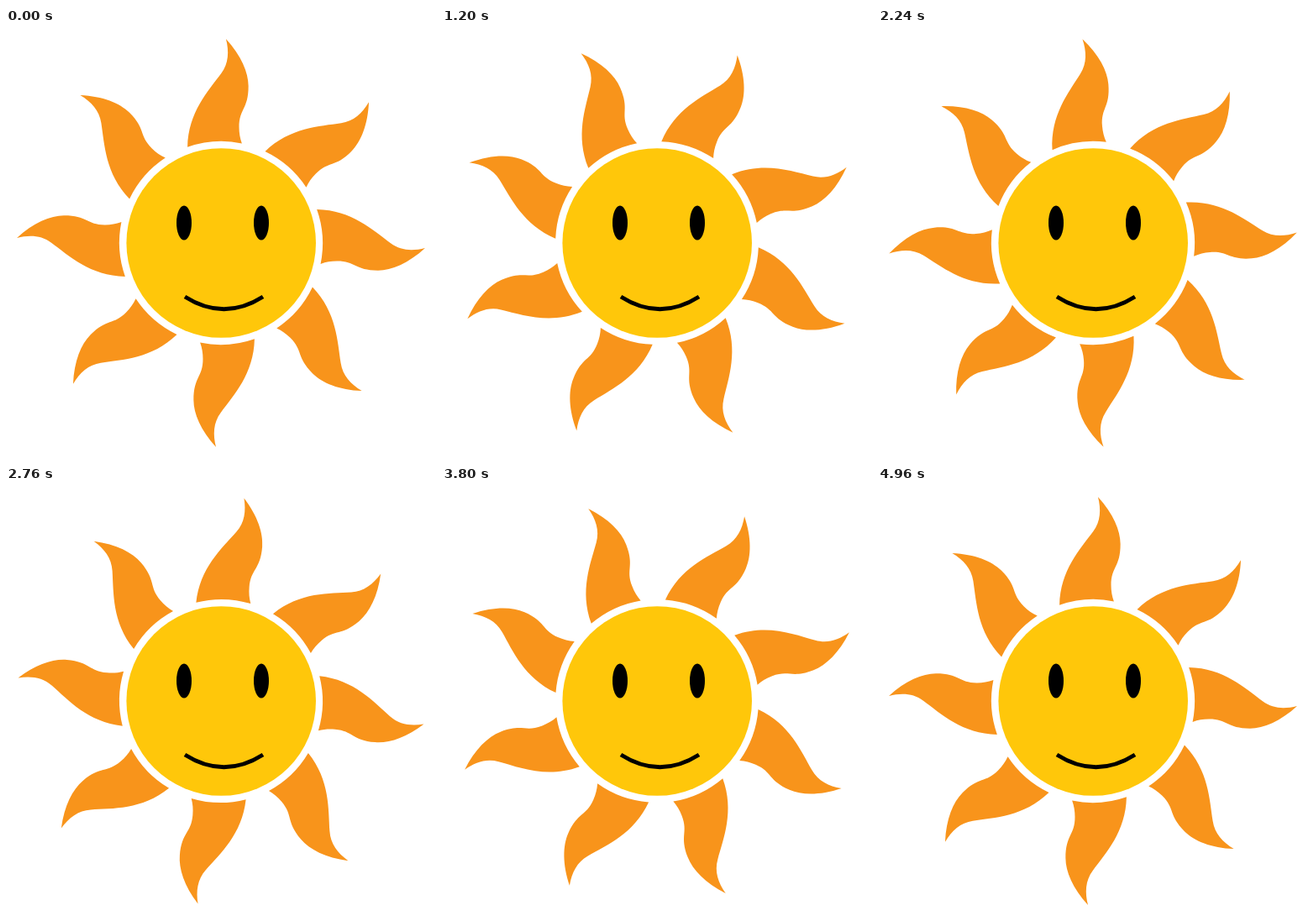
Animation, 512 px wide and 512 px high, one loop 5000 ms. Source, as an HTML page with a canvas:

```html
<!DOCTYPE html>
<html lang="en">
<head>
<meta charset="utf-8">
<title>Smiling sun</title>
<style>
  html, body { margin: 0; width: 100%; height: 100%; overflow: hidden; background: #fff; }
  canvas { display: block; width: 100vmin; height: 100vmin; }
</style>
</head>
<body>
<canvas id="stage" width="512" height="512"></canvas>
<script>
  const ctx = document.getElementById('stage').getContext('2d');
  const LOOP = 5000;
  const STEP = 40;
  const LAST = LOOP - STEP; // the quarter turn is complete on the last step
  const RAYS = 8;
  const TURN = Math.PI / 2;
  const TILT = -0.0035;
  const CENTER = 256;

  // One flame pointing up, relative to the sun's centre.
  const ray = new Path2D(
    'M-39.5 -114.3 C-38.5 -156 -14.5 -181 1 -202 C10 -214 10.5 -228 6.8 -243 ' +
    'C25 -223 33.3 -203 33.3 -187 C33.3 -159 22 -160 22 -138 ' +
    'C22 -131 23 -125 25.3 -118.5 A121.2 121.2 0 0 0 -39.5 -114.3 Z'
  );

  function fillEllipse(x, y, rx, ry, color) {
    ctx.fillStyle = color;
    ctx.beginPath();
    ctx.ellipse(x, y, rx, ry, 0, 0, Math.PI * 2);
    ctx.fill();
  }

  function drawRays(angle) {
    ctx.save();
    ctx.translate(CENTER, CENTER);
    ctx.rotate(angle);
    ctx.fillStyle = '#f8941b';
    for (let i = 0; i < RAYS; i++) {
      ctx.fill(ray);
      ctx.rotate(Math.PI * 2 / RAYS);
    }
    ctx.restore();
  }

  function drawFace() {
    fillEllipse(256.2, 256, 112.8, 112.8, '#ffc70a');
    fillEllipse(212, 232, 9, 20.5, '#000');
    fillEllipse(304, 232, 9, 20.5, '#000');
    ctx.strokeStyle = '#000';
    ctx.lineWidth = 4.8;
    ctx.beginPath();
    ctx.moveTo(213, 320);
    ctx.quadraticCurveTo(259.5, 349.5, 306, 320);
    ctx.stroke();
  }

  function draw(now) {
    const time = Math.floor((now % LOOP) / STEP) * STEP;
    ctx.fillStyle = '#fff';
    ctx.fillRect(0, 0, 512, 512);
    drawRays(TILT + TURN * time / LAST);
    drawFace();
  }

  let start;
  function tick(now) {
    start ??= now;
    draw(now - start);
    requestAnimationFrame(tick);
  }
  draw(0);
  requestAnimationFrame(tick);
</script>
</body>
</html>
```
